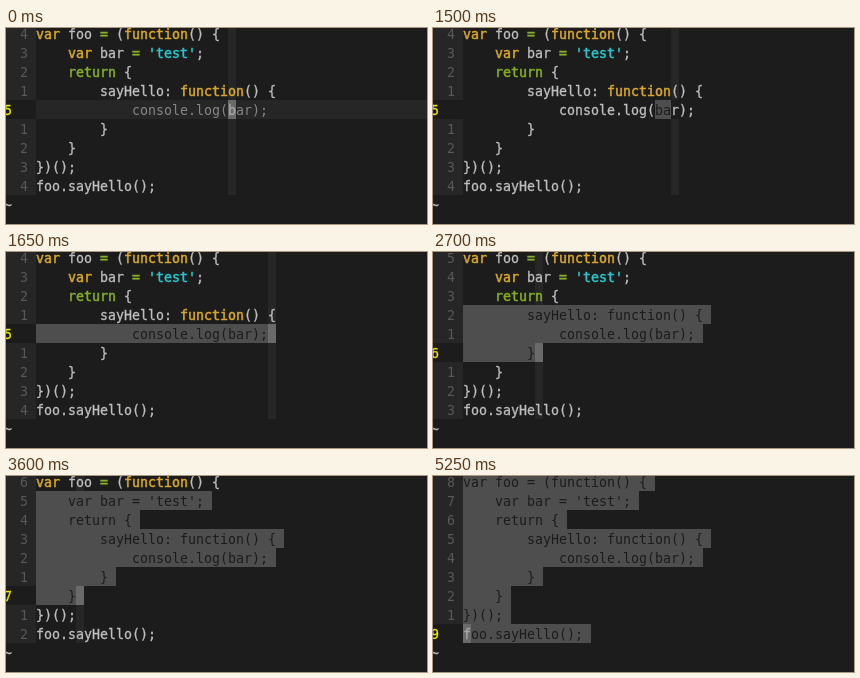
Animation, 421 px wide and 196 px high, one loop 7.36 s. Source, as an HTML page:

```html
<!DOCTYPE html>
<html lang="en">
<head>
<meta charset="utf-8">
<title>Expanding selection</title>
<style>
html, body { margin: 0; width: 100%; height: 100%; overflow: hidden; background: #1c1c1c; }
body {
  position: relative;
  color: #bebebe;
  font: 13.288px/21px "DejaVu Sans Mono", monospace;
  -webkit-text-stroke: .3px;
}
i { position: absolute; width: 8px; height: 19px; font-style: normal; white-space: pre; }
.type, .word, .text { -webkit-text-stroke: .5px; }
.type { color: #d9a82c; }
.word { color: #86ae2a; }
.text { color: #2cc5cc; }
.num { color: #585858; -webkit-text-stroke: 0; }
.now { color: #f0e800; }
.num, .band { background: #262626; }
.dim { color: #858585; -webkit-text-stroke: 0; }
.sel { background: #4e4e4e; color: #1c1c1c; -webkit-text-stroke: 0; }
.cursor { background: #6a6a6a; color: #a8a8a8; }
.match { background: #585858; color: #e02a20; }
</style>
</head>
<body>
<script>
const lines = [
  "var foo = (function() {",
  "    var bar = 'test';",
  "    return {",
  "        sayHello: function() {",
  "            console.log(bar);",
  "        }",
  "    }",
  "})();",
  "foo.sayHello();"
];
const loop = 7360, cols = 49;

// A selection runs from `from` up to `to`, or up to the cursor.
const steps = [
  { at: 0, row: 4, col: 24, cursor: "cursor", line: true },
  { at: 600, row: 4, col: 26, from: [4, 24], cursor: "cursor" },
  { at: 1500, row: 4, col: 26, from: [4, 24], cursor: "" },
  { at: 1650, row: 4, col: 29, from: [4, 0], cursor: "cursor" },
  { at: 2550, row: 4, col: 29, from: [4, 0], cursor: "" },
  { at: 2700, row: 5, col: 9, from: [3, 0], cursor: "cursor" },
  { at: 3600, row: 6, col: 5, from: [1, 0], cursor: "cursor" },
  { at: 4200, row: 7, col: 0, from: [0, 11], cursor: "match" },
  { at: 5250, row: 8, col: 0, from: [0, 0], to: [8, 16], cursor: "cursor" }
];

// Syntax class of every character in a line.
function colour(line) {
  const out = [];
  for (const m of line.matchAll(/(var|function)|(return|=)|('\w+')/g)) {
    const name = m[1] ? "type" : m[2] ? "word" : "text";
    out.length = m.index;
    for (const _ of m[0]) out.push(name);
  }
  return out;
}
const syntax = lines.map(colour);

const cell = (row, col, ch, name) =>
  `<i class="${name}" style="left:${30 + 8 * col}px;top:${19 * row - 4}px">${ch}</i>`;

function selected(s, row, col) {
  if (!s.from || col > lines[row].length) return false;
  const key = (r, c) => r * 100 + c, here = key(row, col);
  return here >= key(...s.from) && here < key(...(s.to || [s.row, s.col]));
}

function style(s, row, col) {
  const atRow = row === s.row, atCol = col === s.col;
  if (atRow && atCol) return s.cursor;
  if (selected(s, row, col)) return "sel";
  if (atRow && s.line) return "band dim";
  return (syntax[row][col] || "") + (atCol ? " band" : "");
}

function draw(s) {
  let html = cell(lines.length, -4, "~", "");
  lines.forEach((line, row) => {
    const away = Math.abs(row - s.row);
    const label = away ? `  ${away} ` : `${row + 1}   `;
    [...label].forEach((ch, k) => html += cell(row, k - 4, ch, away ? "num" : "now"));
    for (let col = 0; col < cols; col++)
      html += cell(row, col, line[col] || " ", style(s, row, col));
  });
  document.body.innerHTML = html;
}

const start = performance.now();
let shown;
function tick() {
  const t = (performance.now() - start) % loop;
  const step = steps.findLast(s => s.at <= t);
  if (step !== shown) draw(shown = step);
  requestAnimationFrame(tick);
}
tick();
</script>
</body>
</html>
```
